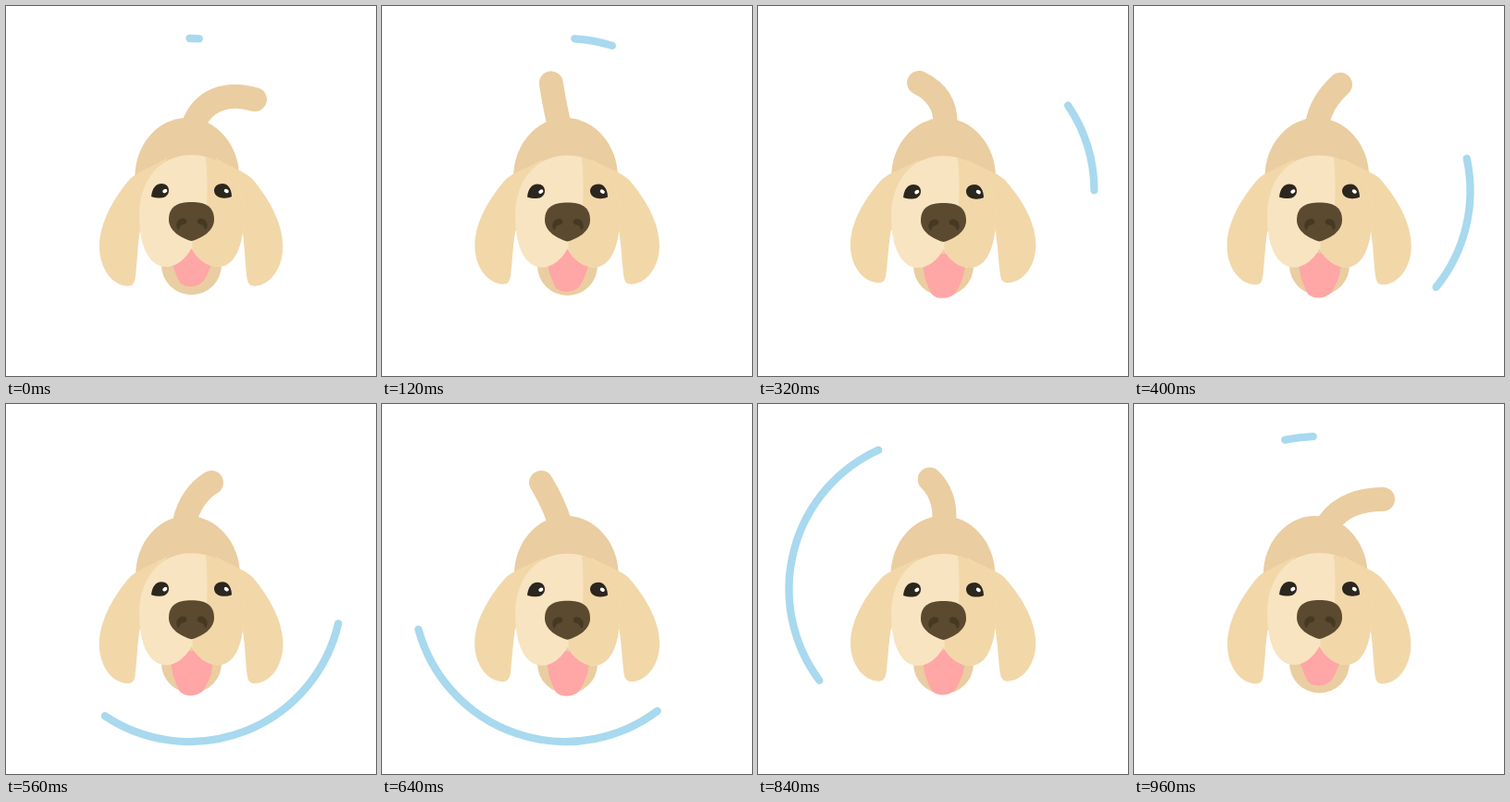
Write an HTML page that moves like this. It is 400 px wide and 400 px high and loops after 1000 ms.

```html
<!DOCTYPE html>
<html lang="en">
<head>
<meta charset="utf-8">
<title>Puppy loader</title>
<style>
  html, body { margin: 0; width: 100%; height: 100%; overflow: hidden; background: #fff; }
  svg { display: block; width: 100%; height: 100%; }
</style>
</head>
<body>
<svg viewBox="0 0 400 400">
  <defs>
    <path id="ear" fill="#f2d7a9" d="M174 164C158 174 142 179 134 187C117 207 101 234 101 260C101 284 115 302 131 302.7C137 303 139 300 140 293C142 275 142 262 144.500 245L165 200Z"/>
    <path id="nostril" fill="#463923" d="M184.500 239C183 231 191 227 195 231C196 235 194 236 190 236.500C188 238 188 240 186 242Z"/>
    <path id="face" d="M200.500 161C165 161 144 190 144 226C144 262 156 282 173 282C184 282 194 274 200.500 262C207 274 218 282 229 282C246 282 257 262 257 226C257 190 236 161 200.500 161Z"/>
    <clipPath id="faceClip"><use href="#face"/></clipPath>
  </defs>

  <path id="ring" fill="none" stroke="#a8d9ee" stroke-width="8.300" stroke-linecap="round"/>
  <path id="tail" fill="none" stroke="#eacda0" stroke-width="26" stroke-linecap="round"/>
  <path id="body" fill="#eacda0" d="M139.400 196V185C139.400 150 164 121 195.700 121C227 121 252.200 150 252.200 185V196Z"/>

  <g id="head">
    <use id="earL" href="#ear"/>
    <g transform="translate(400.300) scale(-1 1)"><use id="earR" href="#ear"/></g>
    <ellipse cx="200.500" cy="280" rx="32.500" ry="32.300" fill="#eacda0"/>
    <path id="tongue" fill="#ffa6a6" d="M176 255L180.500 281Q185 294 188 299Q192 303.200 200 303.200Q208 303 213 298Q217 293 222 279L226 255Z"/>
    <use href="#face" fill="#f8e4c0"/>
    <path clip-path="url(#faceClip)" fill="#f2d7a9" d="M215 155C218 180 218 200 217 215L201.500 253V290H270V155Z"/>
    <path fill="#5b4a30" d="M200.500 212C216 212 225 217 225 231C225 243 212 251 200.500 254C189 251 176 243 176 231C176 217 185 212 200.500 212Z"/>
    <use href="#nostril"/>
    <use href="#nostril" transform="translate(402) scale(-1 1)"/>
    <g fill="#2b261e">
      <path d="M157 206C158 197 162 192 168 192C173 192 176 195 176 199.500C176 204 172 207.500 167 207.500C163 207.500 160 207 157 206Z"/>
      <path d="M225 199.500C225 195 229 192 234 192C240 192 244 198 244 206C241 207.500 237 208 234 207.500C229 207 225 204 225 199.500Z"/>
    </g>
    <g fill="#fff">
      <ellipse cx="171.800" cy="200" rx="2.700" ry="2" transform="rotate(-30 171.800 200)"/>
      <ellipse cx="238.300" cy="200" rx="2.700" ry="2" transform="rotate(30 238.300 200)"/>
    </g>
  </g>
</svg>

<script>
const LOOP = 1000, STEP = 40, WAG = 500;
const $ = id => document.getElementById(id);

// wag phase, then base, two handles and tip of the tail
const TAIL = [
  [0,    203, 128, 213, 102, 238, 92,  269, 101],
  [0.12, 193, 128, 197, 110, 206, 95,  222, 85],
  [0.28, 192, 128, 187, 112, 180, 98,  172, 85],
  [0.4,  196, 128, 191, 106, 170, 94,  147, 94],
  [0.52, 205, 128, 202, 100, 175, 87,  144, 93],
  [0.66, 202, 128, 203, 108, 196, 93,  180, 82],
  [0.8,  198, 128, 201, 110, 211, 96,  223, 85],
  [0.92, 211, 128, 224, 110, 246, 103, 269, 103]
];

// time and share of the circle for the trailing end of the arc
const TRAIL = [[0.07, 0], [0.5, 0.25], [0.75, 0.5], [1, 1]];

const ease = u => {
  u = Math.min(1, Math.max(0, u));
  return u * u * (3 - 2 * u);
};

function trail(t) {
  let v = 0;
  for (let i = 1; i < TRAIL.length; i++) {
    const [t0, a] = TRAIL[i - 1], [t1, b] = TRAIL[i];
    v += (b - a) * ease((t - t0) / (t1 - t0));
  }
  return v;
}

// smooth periodic interpolation through the tail poses
function tailAt(p) {
  const n = TAIL.length;
  const key = i => {
    const k = TAIL[(i + n) % n];
    return [k[0] + Math.floor(i / n), ...k.slice(1)];
  };
  let i = n - 1;
  while (TAIL[i][0] > p) i--;
  const [a, b, c, d] = [i - 1, i, i + 1, i + 2].map(key);
  const h = c[0] - b[0], u = (p - b[0]) / h;
  const slope = (l, m, r, j) => {
    const h0 = m[0] - l[0], h1 = r[0] - m[0];
    return ((m[j] - l[j]) / h0 * h1 + (r[j] - m[j]) / h1 * h0) / (h0 + h1);
  };
  return b.slice(1).map((v, k) => {
    const j = k + 1, s = ease(u);
    return v * (1 - s) + c[j] * s
      + h * u * (1 - u) * ((1 - u) * slope(a, b, c, j) - u * slope(b, c, d, j));
  });
}

function ringPoint(share) {
  const a = share * 2 * Math.PI;
  return (198.5 + 165 * Math.sin(a)).toFixed(2) + " " + (200 - 165 * Math.cos(a)).toFixed(2);
}

function draw(ms) {
  const t = ms / LOOP, p = ms % WAG / WAG;
  const k = (1 - Math.cos(2 * Math.PI * p)) / 2;

  const from = trail(t), to = 0.01 + 0.99 * ease(t);
  $("ring").setAttribute("d",
    `M${ringPoint(from)}A165 165 0 ${to - from > 0.5 ? 1 : 0} 1 ${ringPoint(to)}`);

  const q = tailAt(p).map(v => v.toFixed(2));
  $("tail").setAttribute("d", `M${q[0]} ${q[1]}C${q.slice(2).join(" ")}`);

  $("body").setAttribute("transform", `translate(${5.8 * k})`);
  $("head").setAttribute("transform", `translate(0 ${1.3 * k})`);
  const ear = `translate(150 180) rotate(${k}) scale(1 ${1 - 0.043 * k}) translate(-150 -180)`;
  $("earL").setAttribute("transform", ear);
  $("earR").setAttribute("transform", ear);

  const out = ease(ms / 260) - ease((ms - 800) / 200);
  $("tongue").setAttribute("transform", `translate(0 ${12 * out - 0.5 * k * out})`);
}

function tick() {
  draw(Math.floor(performance.now() % LOOP / STEP) * STEP);
  requestAnimationFrame(tick);
}
draw(0);
requestAnimationFrame(tick);
</script>
</body>
</html>
```
